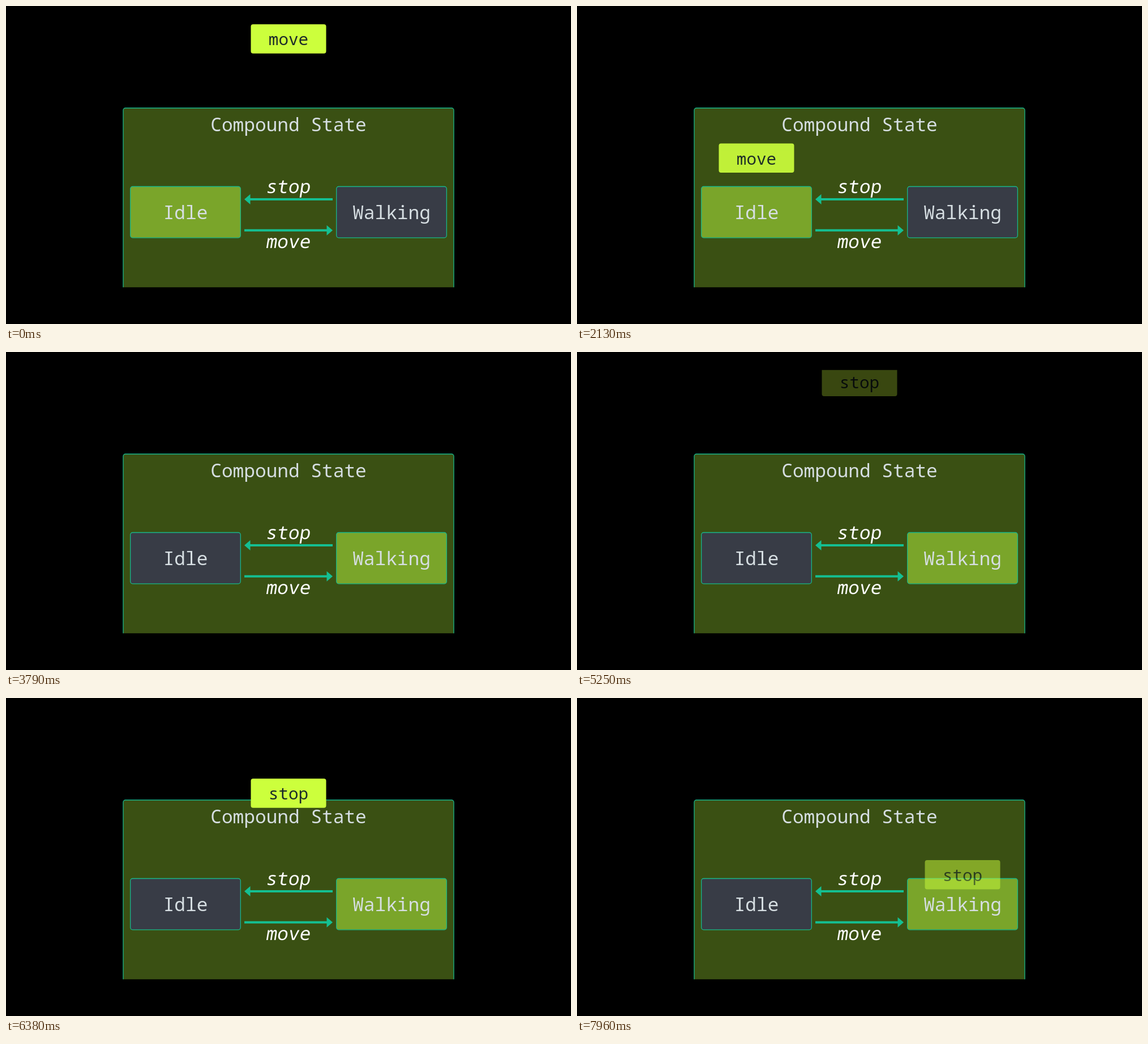
An HTML page that plays this animation: 998 px wide and 561 px high, repeating every 8 s.

```html
<!DOCTYPE html>
<html lang="en">
<head>
<meta charset="utf-8">
<title>Compound state</title>
<style>
  html, body { margin: 0; width: 100%; height: 100%; overflow: hidden; background: #000; }
  svg { display: block; width: 100%; height: 100%; }
  text { font: 32.8px "Noto Sans Mono", "DejaVu Sans Mono", monospace; fill: #d6dee2; text-anchor: middle; }
  .frame { stroke: #18b78b; stroke-width: 1.3; }
  .label { fill: #fff; }
  .arrow { fill: #14bf92; }
  #pill text { font-size: 29.3px; fill: #1b2a2a; }
</style>
</head>
<body>
<svg viewBox="0 0 998 561">
  <clipPath id="view"><rect y="31.7" width="998" height="464.6"/></clipPath>
  <g clip-path="url(#view)">
    <rect class="frame" x="207" y="180" width="584" height="400" rx="4" fill="#3a5013"/>
    <text x="499" y="220.5">Compound State</text>

    <rect id="idle" class="frame" x="219.7" y="318.5" width="194.6" height="90.3" rx="4"/>
    <text x="317" y="376">Idle</text>
    <rect id="walking" class="frame" x="583.7" y="318.5" width="194.6" height="90.3" rx="4"/>
    <text x="681" y="376">Walking</text>

    <path id="arrow" class="arrow" d="M421 341L431.5 332V339H577V343H431.5V350Z"/>
    <path class="arrow" d="M421 341L431.5 332V339H577V343H431.5V350Z" transform="rotate(180 499 368.4)"/>
    <text class="label" transform="translate(497.5 330) skewX(-9)">stop</text>
    <text class="label" transform="translate(497.5 427) skewX(-9)">move</text>

    <g id="pill">
      <rect width="133" height="51.5" rx="4" fill="#ccff3c"/>
      <text x="66.5" y="37.3"></text>
    </g>
  </g>
</svg>
<script>
  const LOOP = 8000;
  const ACTIVE = [122, 165, 42], INACTIVE = [56, 60, 70];
  const START = { x: 432.5, y: 26.5 };
  const HOVER_Y = 234, SIDE = 182, DROP = 104;

  // Each event falls from the top, slides over its state and sinks into it.
  const events = [
    { name: 'move', start: -40, side: -SIDE },
    { name: 'stop', start: 5545, side: SIDE }
  ];

  const idle = document.getElementById('idle');
  const walking = document.getElementById('walking');
  const pill = document.getElementById('pill');
  const pillText = pill.querySelector('text');

  const progress = (t, start, length) => Math.min(1, Math.max(0, (t - start) / length));
  const easeInOut = u => u < 0.5 ? 4 * u ** 3 : 1 - 4 * (1 - u) ** 3;
  const mix = (a, b, p) => `rgb(${a.map((v, i) => v + (b[i] - v) * p)})`;

  function drawPill({ name, start, side }, time) {
    const t = time - start;
    const appear = easeInOut(progress(t, -500, 500));
    const fall = progress(t, 0, 1500);
    const slide = easeInOut(progress(t, 1500, 600));
    const sink = progress(t, 2123, 585);
    const x = START.x + side * slide;
    const y = START.y + (HOVER_Y - START.y) * fall + DROP * sink;
    pillText.textContent = name;
    pill.setAttribute('transform', `translate(${x} ${y})`);
    pill.setAttribute('opacity', appear * (1 - sink));
  }

  function draw(time) {
    drawPill(events[time < 4000 ? 0 : 1], time);
    const change = easeInOut(progress(time, 2670, 500));
    idle.setAttribute('fill', mix(ACTIVE, INACTIVE, change));
    walking.setAttribute('fill', mix(INACTIVE, ACTIVE, change));
  }

  function tick() {
    draw(performance.now() % LOOP);
    requestAnimationFrame(tick);
  }
  tick();
</script>
</body>
</html>
```
